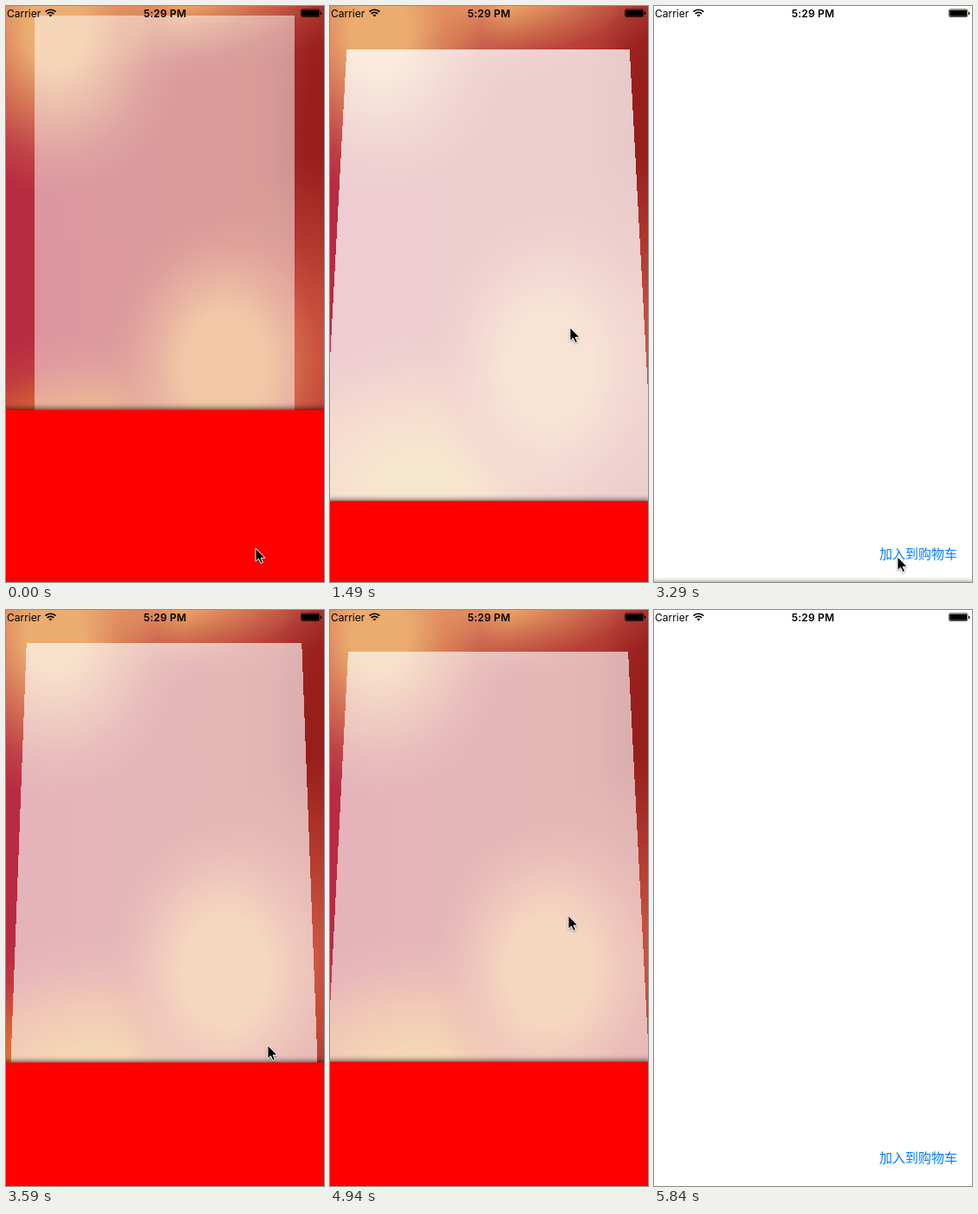
Animation, 367 px wide and 663 px high, one loop 6170 ms. Source, as an HTML page:

```html
<!DOCTYPE html>
<html lang="zh">
<head>
<meta charset="utf-8">
<title>Cart sheet</title>
<style>
  html, body { margin: 0; width: 100%; height: 100%; overflow: hidden; }
  #stage { position: relative; width: 367px; height: 663px; overflow: hidden; }
  #screen { position: absolute; left: -5px; top: -2px; width: 375px; height: 667px; }
  #screen > div { position: absolute; inset: 0; }
  #wallpaper {
    background:
      radial-gradient(135px 175px at 258px 417px, rgb(228,143,78) 0 36%, rgba(216,114,76,.78) 60%, rgba(205,85,66,.4) 82%, transparent),
      radial-gradient(230px 185px at 105px 560px, rgb(228,156,56) 0 18%, rgba(222,115,50,.85) 55%, rgba(205,80,60,.4) 80%, transparent),
      radial-gradient(150px 190px at 62px 30px, rgb(235,172,112) 0 22%, rgba(220,135,92,.8) 50%, rgba(200,92,78,.45) 78%, transparent),
      radial-gradient(290px 130px at 140px -38px, rgb(242,175,106) 0 35%, rgba(212,122,86,.8) 62%, rgba(195,85,75,.35) 82%, transparent),
      radial-gradient(150px 230px at 375px 400px, rgba(208,86,66,.9), transparent),
      radial-gradient(65px 210px at 375px 150px, rgb(152,30,28) 35%, transparent),
      linear-gradient(90deg, rgb(184,42,66), rgb(183,54,58) 40%, rgb(180,55,46) 75%, rgb(162,42,38));
  }
  #page { background: #fff; }
  #page span {
    position: absolute; left: 265px; top: 621px; line-height: 22px; white-space: nowrap;
    font-size: 15px; color: #007aff; font-family: "Noto Sans CJK SC", "Noto Sans CJK", sans-serif;
  }
  #screen > #sheet { top: 467px; bottom: auto; height: 200px; background: #f00; box-shadow: 0 -1px 7px rgba(0,0,0,.8); }
  svg { position: absolute; inset: 0; }
  text { font: 12px Inter, sans-serif; }
</style>
</head>
<body>
<div id="stage">
  <div id="screen">
    <div id="wallpaper"></div>
    <div id="page"><span>加入到购物车</span></div>
    <div id="sheet"></div>
  </div>
  <svg width="367" height="663">
    <text x="1" y="12.5">Carrier</text>
    <g fill="none" stroke="#000" stroke-width="1.7">
      <path d="M45.5 6.7a8.3 8.3 0 0 1 11.8 0M47.6 9a5.4 5.4 0 0 1 7.6 0"/>
      <path d="M51.4 12.6l-2-2a2.9 2.9 0 0 1 4 0z" fill="#000" stroke="none"/>
    </g>
    <text x="183.5" y="12.5" text-anchor="middle" font-weight="600" style="font-weight:600;letter-spacing:.2px">5:29 PM</text>
    <rect x="340.5" y="3.9" width="21.4" height="8.6" rx="1.4" fill="none" stroke="#000" stroke-width=".7"/>
    <rect x="341.3" y="4.7" width="19.8" height="7" rx=".7"/>
    <path d="M363 6.4a2 2 0 0 1 0 3.8z"/>
    <path id="cursor" d="M0 0V15.5L3.5 12.2L6 17.6L8.6 16.5L6.2 11.3H11Z" stroke="#fff" style="filter:drop-shadow(0 1px 1px rgba(0,0,0,.35))"/>
  </svg>
</div>
<script>
const LOOP = 6170, SLIDE = 500, PHASE = 228;
const [page, sheet, cursor] = ['page', 'sheet', 'cursor'].map(id => document.getElementById(id));

// page poses: tilt in degrees, scale, vertical shift
const FLAT = [0, 1, 0], LEANING = [15, .95, 0], BACK = [0, .8, -53.4];
const OPENING = [FLAT, LEANING, BACK], CLOSING = [BACK, LEANING, FLAT];

// start time, opens?
const moves = [[-SLIDE, true], [1233, false], [3273, true], [4758, false]];

// pointer: time, x, y
const path = [
  [0, 288, 624], [440, 288, 624], [590, 295, 600], [740, 300, 520], [890, 285, 415],
  [1040, 277, 370], [1790, 277, 370], [2090, 274, 482], [2240, 281, 603], [2540, 281, 634],
  [3290, 281, 634], [3590, 302, 501], [4040, 281, 361], [4190, 275, 351],
  [5240, 275, 352], [5690, 324, 659]
];

const clamp = v => Math.min(1, Math.max(0, v));
const lerp = (a, b, k) => a + (b - a) * k;

// cubic-bezier(.42, 0, .58, 1)
function ease(x) {
  x = clamp(x);
  let lo = 0, hi = 1;
  for (let i = 0; i < 20; i++) {
    const s = (lo + hi) / 2, r = 1 - s;
    if (3 * r * r * s * .42 + 3 * r * s * s * .58 + s ** 3 < x) lo = s; else hi = s;
  }
  return lo * lo * (3 - 2 * lo);
}

function drawSheet(t) {
  const [start, opens] = moves.findLast(m => m[0] <= t);
  const elapsed = t - start;
  const slide = ease(elapsed / SLIDE);
  const open = opens ? slide : 1 - slide;
  const first = ease(elapsed / PHASE), second = ease(elapsed / PHASE - 1);
  const [from, mid, to] = opens ? OPENING : CLOSING;
  const [tilt, scale, shift] = mid.map((m, i) => lerp(from[i], m, first) + (to[i] - m) * second);

  page.style.opacity = 1 - open / 2;
  page.style.transform = `perspective(900px) translateY(${shift}px) scale(${scale}) rotateX(${tilt}deg)`;
  sheet.style.transform = `translateY(${200 * (1 - open)}px)`;
  sheet.style.visibility = open > .0001 ? 'visible' : 'hidden';
}

function drawCursor(t) {
  const next = path.findIndex(p => p[0] > t);
  const [t0, x0, y0] = path.at(next < 0 ? -1 : next - 1);
  const [t1, x1, y1] = path.at(next);
  const k = next < 0 ? 0 : (t - t0) / (t1 - t0);
  cursor.setAttribute('transform', `translate(${lerp(x0, x1, k)} ${lerp(y0, y1, k)})`);
  cursor.style.visibility = t < 5840 ? 'visible' : 'hidden';
}

function frame() {
  const now = performance.now() % LOOP;
  const t = now < 600 ? 0 : Math.floor((now + 10) / 150) * 150 - 10;
  drawSheet(t);
  drawCursor(t);
  requestAnimationFrame(frame);
}
frame();
</script>
</body>
</html>
```
